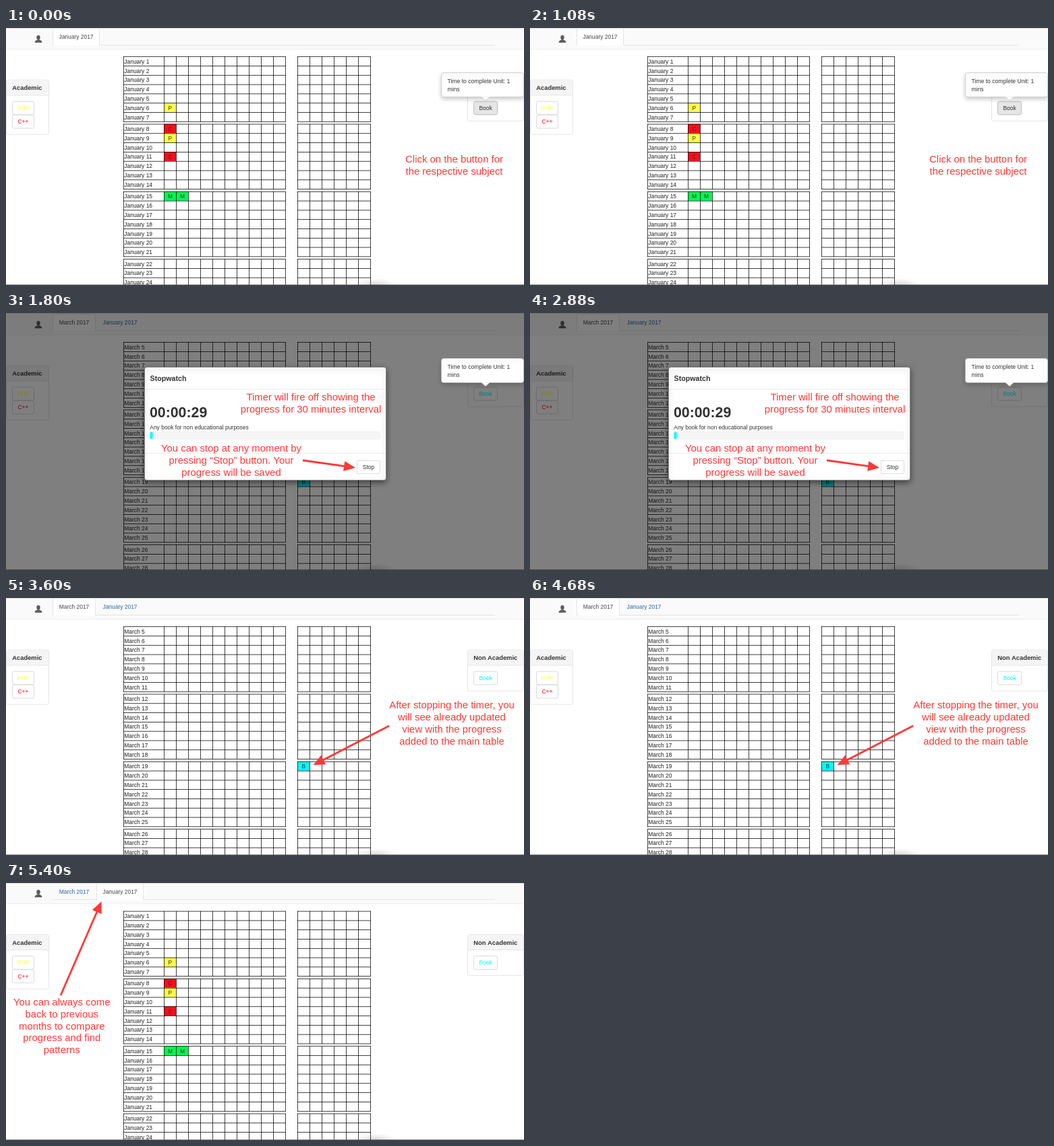
Animation, 768 px wide and 382 px high, one loop 7.2 s. Source, as an HTML page with a canvas:

```html
<!DOCTYPE html>
<html lang="en">
<head>
<meta charset="utf-8">
<title>Study planner</title>
<style>
html, body { margin: 0; width: 100%; height: 100%; overflow: hidden; background: #fff; }
canvas { display: block; width: 768px; height: 382px; }
</style>
</head>
<body>
<canvas id="stage" width="768" height="382"></canvas>
<script>
const ctx = document.getElementById('stage').getContext('2d');
const W = 768, H = 382, SCENE_MS = 1800;
const FONT = '"Liberation Sans", Arial, sans-serif';
const YELLOW = '#ffff4a', RED = '#fc0d1b', GREEN = '#00fb50', CYAN = '#00ffff';
const NOTE = '#ff3838', INK = '#333', LINK = '#2b65a5';
const ROW = 13.8, GROUP = 100.3, TOP = 42.3, LINE = 0.75;

function text(str, x, y, { size = 8.45, color = INK, bold = false, align = 'left' } = {}) {
  ctx.font = `${bold ? 'bold ' : ''}${size}px ${FONT}`;
  ctx.fillStyle = color;
  ctx.textAlign = align;
  ctx.fillText(str, x, y);
}

function rect(x, y, w, h, color) {
  ctx.fillStyle = color;
  ctx.fillRect(x, y, w, h);
}

function box(x, y, w, h, r, fill, stroke) {
  ctx.beginPath();
  ctx.roundRect(x + 0.5, y + 0.5, w - 1, h - 1, r);
  ctx.fillStyle = fill;
  ctx.fill();
  if (!stroke) return;
  ctx.strokeStyle = stroke;
  ctx.lineWidth = LINE;
  ctx.stroke();
}

function shadow(color, blur, dy) {
  ctx.shadowColor = color;
  ctx.shadowBlur = blur;
  ctx.shadowOffsetY = dy;
}

function button(label, x, y, w, h, color, fill = '#fff', stroke = '#ccc') {
  box(x, y, w, h, 2.4, fill, stroke);
  text(label, x + w / 2, y + h / 2 + 3, { color, align: 'center' });
}

function userIcon() {
  ctx.fillStyle = '#5c5c5c';
  ctx.beginPath();
  ctx.ellipse(48, 14.1, 2.7, 3.4, 0, 0, Math.PI * 2);
  ctx.fill();
  ctx.beginPath();
  ctx.moveTo(42.6, 21.8);
  ctx.quadraticCurveTo(42.4, 19.1, 44.5, 18.5);
  ctx.lineTo(46.8, 17.3);
  ctx.lineTo(49.2, 17.3);
  ctx.lineTo(51.5, 18.5);
  ctx.quadraticCurveTo(53.6, 19.1, 53.4, 21.8);
  ctx.fill();
}

function navbar(tabs, active) {
  rect(0, -1, W, 32, '#fafafa');
  rect(0, 31, W, LINE, '#e7e7e7');
  userIcon();
  rect(69, 25, 656, LINE, '#ddd');
  let x = 69;
  tabs.forEach((name, i) => {
    const w = name.startsWith('March') ? 64 : 70;
    if (i === active) {
      box(x, 0, w, 30, 2.4, '#fff', '#ddd');
      rect(x - 1, 26, w + 2, 5, '#fafafa');
      rect(x + 1, 25, w - 2, 1, '#fff');
    }
    text(name, x + w / 2, 16.3, { color: i === active ? '#444' : LINK, align: 'center' });
    x += w + 1;
  });
}

function panel(title, x, w, h) {
  box(x, 76.7, w, h, 2.4, '#fff', '#ddd');
  rect(x + 1, 77.7, w - 2, 22, '#f5f5f5');
  rect(x + 1, 99.7, w - 2, LINE, '#ddd');
  text(title, x + 9.3, 92.2, { size: 9.35, bold: true });
}

const rowY = (group, row) => TOP + group * GROUP + row * ROW;

function grid(x, cols, lead, group) {
  const y = rowY(group, 0), w = lead + cols * 18;
  const vertical = vx => rect(vx, y, LINE, 7 * ROW + LINE, '#000');
  for (let r = 0; r <= 7; r++) rect(x, rowY(group, r), w + LINE, LINE, '#000');
  if (lead) vertical(x);
  for (let c = 0; c <= cols; c++) vertical(x + lead + c * 18);
}

// Each mark: letter, colour, day index, x of its cell
function tables(month, firstDay, marks) {
  for (const [letter, color, day, x] of marks) {
    const y = rowY(Math.floor(day / 7), day % 7);
    rect(x, y, 18, ROW, color);
    text(letter, x + 9.4, y + 10.2, { align: 'center' });
  }
  for (let g = 0; g < 4; g++) {
    for (let r = 0; r < 7; r++) {
      text(`${month} ${firstDay + g * 7 + r}`, 175.3, rowY(g, r) + 10.4, { color: '#222' });
    }
    grid(174, 10, 60, g);
    grid(432, 6, 0, g);
  }
}

function popover() {
  shadow('rgba(0,0,0,.2)', 6, 3);
  box(645, 66, 123, 37, 3.6, '#fff', '#c4c4c4');
  shadow('transparent', 0, 0);
  ctx.beginPath();
  ctx.moveTo(705, 102.5);
  ctx.lineTo(711, 108);
  ctx.lineTo(717, 102.5);
  ctx.fillStyle = '#fff';
  ctx.fill();
  ctx.stroke();
  rect(705, 101, 12, 1.5, '#fff');
  text('Time to complete Unit: 1', 654.5, 82.2, { size: 8.6 });
  text('mins', 654.5, 94.2, { size: 8.6 });
}

function note(lines, x, y) {
  lines.forEach((line, i) =>
    text(line, x, y + i * 17.8, { size: 14.9, color: NOTE, align: 'center' }));
}

function arrow(x1, y1, x2, y2) {
  const len = Math.hypot(x2 - x1, y2 - y1);
  ctx.save();
  ctx.translate(x1, y1);
  ctx.rotate(Math.atan2(y2 - y1, x2 - x1));
  ctx.fillStyle = NOTE;
  ctx.fillRect(0, -1.4, len - 15, 2.8);
  ctx.beginPath();
  ctx.moveTo(len, 0);
  ctx.lineTo(len - 17, -7.5);
  ctx.lineTo(len - 17, 7.5);
  ctx.fill();
  ctx.restore();
}

function modal() {
  shadow('rgba(0,0,0,.5)', 9, 3);
  box(205, 80, 359, 169, 3.6, '#fff', '#777');
  shadow('transparent', 0, 0);
  text('Stopwatch', 213.5, 100.5, { size: 10.7, bold: true });
  rect(206, 113, 357, LINE, '#e5e5e5');
  text('00:00:29', 213, 154.5, { size: 21.3, bold: true });
  text('Any book for non educational purposes', 213.3, 173);
  box(213, 176, 342, 12, 2.4, '#f5f5f5', '#ececec');
  box(213, 176, 5, 12, 2, CYAN);
  rect(206, 208, 357, LINE, '#e5e5e5');
  button('Stop', 520, 218.7, 35, 20.6, INK);
}

function windowEdge() {
  const glow = ctx.createRadialGradient(0, 0, 0, 0, 0, 1);
  glow.addColorStop(0, 'rgba(0,0,0,.14)');
  glow.addColorStop(1, 'rgba(0,0,0,0)');
  ctx.save();
  ctx.translate(548, H);
  ctx.scale(32, 10);
  rect(-1, -1, 2, 1, glow);
  ctx.restore();
  rect(0, 0, W, 1, '#dedede');
  rect(0, H - 1, W, 1, 'rgba(80,80,80,.6)');
}

function page({ month, firstDay, tabs, active, marks, hover, dy = 0 }) {
  ctx.save();
  ctx.translate(0, dy);
  navbar(tabs, active);
  panel('Academic', 0, 64, 82);
  button('PHP', 9, 108.6, 33, 20.8, YELLOW);
  button('C++', 9, 128.7, 33, 20.8, RED);
  panel('Non Academic', 684, 84, 62);
  if (hover) button('Book', 693, 108.6, 36, 20.8, INK, '#e6e6e6', '#adadad');
  else button('Book', 693, 108.6, 36, 20.8, CYAN);
  tables(month, firstDay, marks);
  ctx.restore();
  windowEdge();
}

const january = {
  month: 'January', firstDay: 1,
  marks: [
    ['P', YELLOW, 5, 234], ['C', RED, 7, 234], ['P', YELLOW, 8, 234],
    ['C', RED, 10, 234], ['M', GREEN, 14, 234], ['M', GREEN, 14, 252]
  ]
};
const march = {
  month: 'March', firstDay: 5, marks: [['B', CYAN, 14, 432]],
  tabs: ['March 2017', 'January 2017'], active: 0
};

const scenes = [
  () => {
    page({ ...january, tabs: ['January 2017'], active: 0, hover: true });
    popover();
    note(['Click on the button for', 'the respective subject'], 664.5, 199.7);
  },
  () => {
    page({ ...march, dy: 1 });
    rect(0, 0, W, H, 'rgba(0,0,0,.5)');
    ctx.save();
    ctx.translate(0, 1);
    popover();
    ctx.restore();
    modal();
    note(['Timer will fire off showing the', 'progress for 30 minutes interval'], 452, 130.2);
    note(['You can stop at any moment by', 'pressing “Stop” button. Your', 'progress will be saved'], 334, 206.3);
    arrow(440, 219, 518, 230);
  },
  () => {
    page(march);
    note(['After stopping the timer, you', 'will see already updated', 'view with the progress', 'added to the main table'], 661, 164.3);
    arrow(568, 190, 455.5, 248.3);
  },
  () => {
    page({ ...january, tabs: march.tabs, active: 1, dy: -0.6 });
    note(['You can always come', 'back to previous', 'months to compare', 'progress and find', 'patterns'], 82.7, 182);
    arrow(81, 167, 141.5, 27.5);
  }
];

const start = performance.now();
function frame() {
  const t = performance.now() - start;
  rect(0, 0, W, H, '#fff');
  scenes[Math.floor(t / SCENE_MS) % scenes.length]();
  requestAnimationFrame(frame);
}
frame();
</script>
</body>
</html>
```
